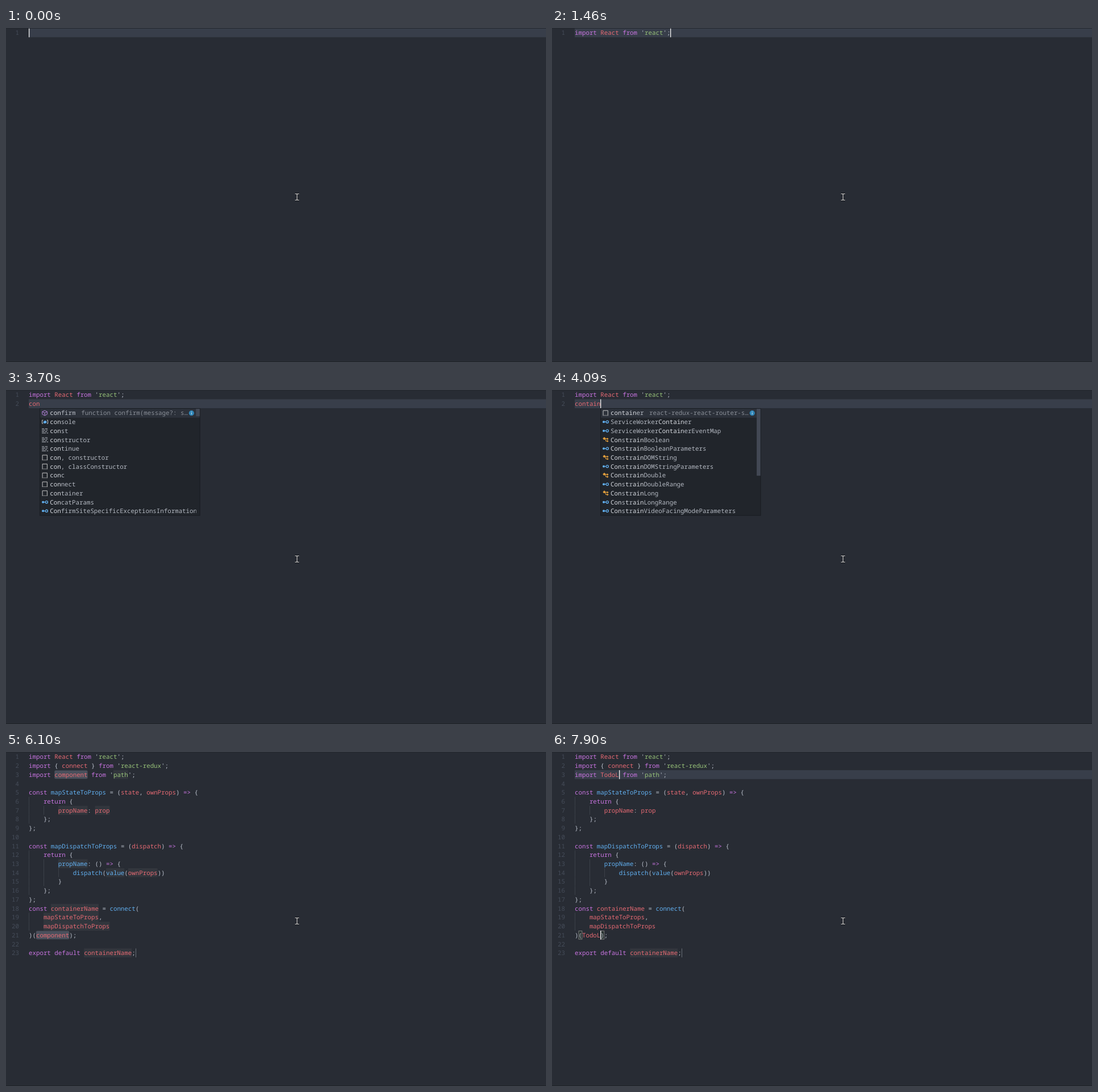
An HTML page for the animation above (8000 ms loop, 950 px wide and 589 px high).

```html
<!DOCTYPE html>
<html lang="en">
<head>
<meta charset="utf-8">
<title>Editor snippets</title>
<style>
  html, body { margin: 0; width: 100%; height: 100%; overflow: hidden; background: #282c34; }
  svg { display: block; }
  text {
    font: 10.79px "Noto Sans Mono", "DejaVu Sans Mono", monospace;
    white-space: pre;
    text-rendering: geometricPrecision;
  }
</style>
</head>
<body>
<svg id="stage" width="950" height="589" viewBox="0 0 950 589"></svg>
<script>
const LOOP = 8000, LEFT = 40, CW = 6.475, LH = 15.72, BASE = 11.8;
const POP_W = 282, ROWS = 12;
const C = {
  key: '#c974e1', red: '#e66a73', str: '#98c379', blue: '#61afef', fg: '#b9bfca',
  num: '#454c59', line: '#383e4a', guide: '#3b4048', mark: '#32363d', same: '#4a505c'
};

const stage = document.getElementById('stage');
const lineY = n => 0.6 + (n - 1) * LH;
const colX = c => LEFT + c * CW;
const rect = (x, y, w, h, fill, extra = '') =>
  `<rect x="${x}" y="${y}" width="${w}" height="${h}" fill="${fill}" ${extra}/>`;
const label = (x, y, s, fill, extra = '') =>
  `<text x="${x}" y="${y}" fill="${fill}" ${extra}>${s}</text>`;
const path = (d, color, width = 1, fill = 'none', extra = '') =>
  `<path d="${d}" fill="${fill}" stroke="${color}" stroke-width="${width}" ${extra}/>`;

// ---- documents ----
const HEAD = "import React from 'react';";
const snippet = name => `${HEAD}
import { connect } from 'react-redux';
import ${name} from 'path';

const mapStateToProps = (state, ownProps) => {
    return {
        propName: prop
    };
};

const mapDispatchToProps = (dispatch) => {
    return {
        propName: () => {
            dispatch(value(ownProps))
        }
    };
};
const containerName = connect(
    mapStateToProps,
    mapDispatchToProps
)(${name});

export default containerName;`;

const MARKS = [
  [3, 'path'], [7, 'propName'], [7, 'prop'], [13, 'propName'], [14, 'value'], [14, 'ownProps'],
  [18, 'containerName'], [19, 'mapStateToProps'], [20, 'mapDispatchToProps'], [23, 'containerName']
];

// ---- suggestion lists: icon letter, then label with *matched* parts ----
const LISTS = {
  i: { thumb: 13, detail: 'if', items: ['k*i*f', 'k*i*mport', 'k*i*n', 'k*i*nstanceof', 'k*i*nterface',
    's*i*md', 's*i*me', 's*i*mn', 's*i*mp', 's*i*mr', 's*i*mrc', 'v*i*sNaN'] },
  im: { thumb: 40, detail: 'import', items: ['k*im*port', 'k*im*plements', 's*im*d', 's*im*e', 's*im*n', 's*im*p',
    's*im*r', 's*im*rc', 's*im*rd', 's*im*rs', 'i*Im*ageData', 'i*Im*ageBitmap'] },
  imr: { thumb: 118, detail: 'import React', items: ['s*imr*', 's*imr*c', 's*imr*d', 's*imr*s', 's*imr*cp', 's*imr*pc',
    's*imr*pcp', 's*imr*se', 's*imr*r', 's*imr*n', 'i*Im*ageBitmap*R*enderingContext', 'i*Im*ageBitmapSou*r*ce'] },
  con: { thumb: 13, detail: 'function confirm(message?: s…', items: ['m*con*firm', 'v*con*sole', 'k*con*st',
    'k*con*structor', 'k*con*tinue', 's*con*, constructor', 's*con*, classConstructor', 's*con*c',
    's*con*nect', 's*con*tainer', 'i*Con*catParams', 'i*Con*firmSiteSpecificExceptionsInformation'] },
  cont: { thumb: 60, detail: '', items: ['k*cont*inue', 's*cont*ainer', 'k*con*s*t*', 'k*con*s*t*ructor',
    's*con*, cons*t*ructor', 's*con*nec*t*', 'iServiceWorker*Cont*ainer', 'iServiceWorker*Cont*ainerEventMap',
    'c*Con*s*t*rainBoolean', 'i*Con*s*t*rainBooleanParameters', 'c*Con*s*t*rainDOMString', 'i*Con*s*t*rainDOMStringParameters'] },
  contain: { thumb: 118, detail: 'react-redux-react-router-s…', items: ['s*contain*er', 'iServiceWorker*Contain*er',
    'iServiceWorker*Contain*erEventMap', 'c*Con*s*t*r*ain*Boolean', 'i*Con*s*t*r*ain*BooleanParameters',
    'c*Con*s*t*r*ain*DOMString', 'i*Con*s*t*r*ain*DOMStringParameters', 'c*Con*s*t*r*ain*Double',
    'i*Con*s*t*r*ain*DoubleRange', 'c*Con*s*t*r*ain*Long', 'i*Con*s*t*r*ain*LongRange',
    'i*Con*s*t*r*ain*VideoFacingModeParameters'] }
};

// ---- timeline: time, document, caret visible, suggestion list, mode ----
const typed = s => `${HEAD}\n${s}`;
const STEPS = [
  [0, '', 1], [300, '', 0],
  [700, 'i', 1], [820, 'i', 1, 'i'], [970, 'im', 1, 'im'], [1090, 'imr', 1, 'imr'],
  [1460, HEAD, 1], [1890, typed(''), 1], [2450, typed(''), 0], [2880, typed(''), 1],
  [3030, typed('c'), 1], [3150, typed('co'), 1, 'con'], [3270, typed('con'), 1, 'con'],
  [3700, typed('con'), 0, 'con'], [3820, typed('cont'), 1, 'cont'],
  [3970, typed('conta'), 1, 'contain'], [4090, typed('contain'), 1, 'contain'],
  [4650, 'component', 1, '', 'select'], [5090, 'component', 0, '', 'select'],
  [5670, 'component', 1, '', 'select'], [6100, 'component', 0, '', 'select'],
  [6250, 'T', 1, '', 'edit'], [6800, 'T', 0, '', 'edit'], [7070, 'To', 1, '', 'edit'],
  [7220, 'Tod', 1, '', 'edit'], [7340, 'Todo', 1, '', 'edit'], [7900, 'TodoL', 1, '', 'edit']
];

// ---- syntax colours ----
const TOKEN = new RegExp([
  "'(?<str>[^']*)'",
  '(?<key>\\b(?:import|from|const|return|export|default)\\b|=>)',
  '(?<param>\\w+(?=[^()]*\\) =>))',
  '(?<blue>\\b\\w+(?=\\(| = \\(|: \\())',
  '(?<red>\\w+)',
  '(?<fg>[^\\s\\w])'
].join('|'), 'g');

function codeLine(s, n) {
  const y = lineY(n) + BASE;
  let out = '';
  for (const m of s.matchAll(TOKEN)) {
    const g = m.groups;
    const put = (dc, str, color, extra) => out += label(colX(m.index + dc), y, str, color, extra);
    if (g.str !== undefined) {
      put(0, "'", C.fg);
      put(1, g.str, C.str);
      put(m[0].length - 1, "'", C.fg);
    } else if (g.param) put(0, m[0], C.red, 'font-style="italic"');
    else put(0, m[0], C[['key', 'blue', 'red', 'fg'].find(k => g[k])]);
  }
  return out;
}

function guides(s, n) {
  let out = '';
  const indent = s.search(/\S/);
  for (let c = 0; c < indent; c += 4) out += rect(Math.round(colX(c)), lineY(n), 1, LH, C.guide);
  return out;
}

// ---- suggestion popup ----
const ICONS = {
  m: path('M5 .7 9.3 2.8V7.4L5 9.6 .7 7.4V2.8ZM.7 2.8 5 5 9.3 2.8M5 5V9.6', '#b180d7'),
  v: path('M2.3 2H.5V8H2.3M8.7 2H10.5V8H8.7', '#c5c5c5') + path('M3 5 5.5 3 8 4.5V6L5.5 7.5 3 6.5Z', C.blue, 1, C.blue),
  k: path('M0 1.5H4M5.5 1.5H10M0 4H6M7.5 4H10M0 6.5H4M5.5 6.5H9M0 9H7M8.5 9H11', '#b8bcc4'),
  s: path('M1 9V.8H9.3V9', '#c5c5c5') + path('M.5 9.4H10', '#c5c5c5', 1, 'none', 'stroke-dasharray="1.6 1"'),
  i: `<circle cx="2" cy="5" r="2" fill="${C.blue}"/>` + path('M3 5H6', C.blue, 1.2) +
     `<circle cx="8.2" cy="5" r="2.1" fill="none" stroke="${C.blue}" stroke-width="1.3"/>`,
  c: path('M3 .8 5.2 3 3 5.2 .8 3Z', '#e8a33d', 1, '#e8a33d') + path('M5 3.2H8M5.5 4V7.5H8', '#e8a33d') +
     path('M8.6 2.2 10 3.6 8.6 5 7.2 3.6ZM8.6 6.2 10 7.6 8.6 9 7.2 7.6Z', '#e8a33d', .8, '#e8a33d')
};

function popup(name, x, y) {
  const list = LISTS[name], h = ROWS * LH;
  let rows = '';
  list.items.forEach((item, i) => {
    const ty = i * LH + BASE;
    rows += `<g transform="translate(3.5 ${i * LH + 2.8})">${ICONS[item[0]]}</g>`;
    let tx = 17.6;
    item.slice(1).split('*').forEach((run, k) => {
      const bold = k % 2;
      if (run) rows += label(tx, ty, run, bold ? '#d7dae0' : '#b4b9c2', bold ? 'font-weight="700"' : '');
      tx += run.length * CW;
    });
    if (i === 0) rows += label(tx + 1.5 * CW, ty, list.detail, '#898e97');
  });
  const info = '<circle cx="266.7" cy="8" r="4.6" fill="#2f86b8"/>' +
    rect(266.2, 7.2, 1, 3.4, '#d5e6f0') + rect(266.2, 5.2, 1, 1.1, '#d5e6f0');
  return `<g transform="translate(${x} ${y})">` +
    rect(0, 0, POP_W - .5, h, '#21252b', 'stroke="#1a1d22"') +
    rect(.5, .5, POP_W - 1.5, LH, '#2c313a') +
    `<svg width="275" height="${h}">${rows}</svg>${info}` +
    rect(274.6, .5, 6.6, list.thumb, '#424854') + '</g>';
}

const caret = (n, c) => rect(Math.round(colX(c)), lineY(n), 1.3, LH, '#f4f4f4');

const MOUSE = 'M508.5 292.5H511L512 293.3 513 292.5H515.5M512 293V303M508.5 303.5H511L512 302.7 513 303.5H515.5';
const pointer = path(MOUSE, '#14161a', 2.8) + path(MOUSE, '#e8e8e8', 1.1);

function draw([, doc, on, list, mode]) {
  const lines = (mode ? snippet(doc) : doc).split('\n');
  const len = doc.length, last = lines.length, end = lines[last - 1].length;
  const carets = mode ? [[3, 7 + len], [21, 2 + len]] : [[last, end]];
  let out = rect(0, 0, 950, 589, '#282c34');

  if (mode !== 'select') out += rect(LEFT, lineY(carets[0][0]), 910, LH, C.line);
  if (mode) {
    for (const [n, word] of MARKS) {
      if (mode === 'edit' && n !== last) continue;
      out += rect(colX(lines[n - 1].lastIndexOf(word)), lineY(n), word.length * CW, LH, C.mark);
    }
    out += rect(Math.round(colX(end)), lineY(last), 1, LH, '#686d76');
  }
  if (mode === 'select') {
    for (const [n, c] of carets) out += rect(colX(c - len), lineY(n) + .5, len * CW, LH - 1, C.same, 'rx="2"');
  }
  if (mode === 'edit') {
    for (const c of [1, 2 + len]) {
      out += rect(colX(c) + .5, lineY(21) + .6, CW - .6, LH - 1.2, '#27312f', 'stroke="#858585" stroke-width=".9"');
    }
  }

  lines.forEach((s, i) => {
    const n = i + 1;
    out += label(22.9, lineY(n) + BASE, n, C.num, 'text-anchor="end"') + guides(s, n) + codeLine(s, n);
  });
  if (on) for (const [n, c] of carets) out += caret(n, c);
  if (list) out += popup(list, colX(end) + .2, lineY(last + 1) + .6);

  out += rect(0, 0, 950, .7, '#20242a') + rect(0, 588, 950, 1, '#1e2228') + pointer;
  stage.innerHTML = out;
}

let shown;
const start = performance.now();
function tick() {
  const t = (performance.now() - start) % LOOP;
  const step = STEPS.filter(s => s[0] <= t).pop() || STEPS[0];
  if (step !== shown) draw(shown = step);
  requestAnimationFrame(tick);
}
tick();
</script>
</body>
</html>
```
